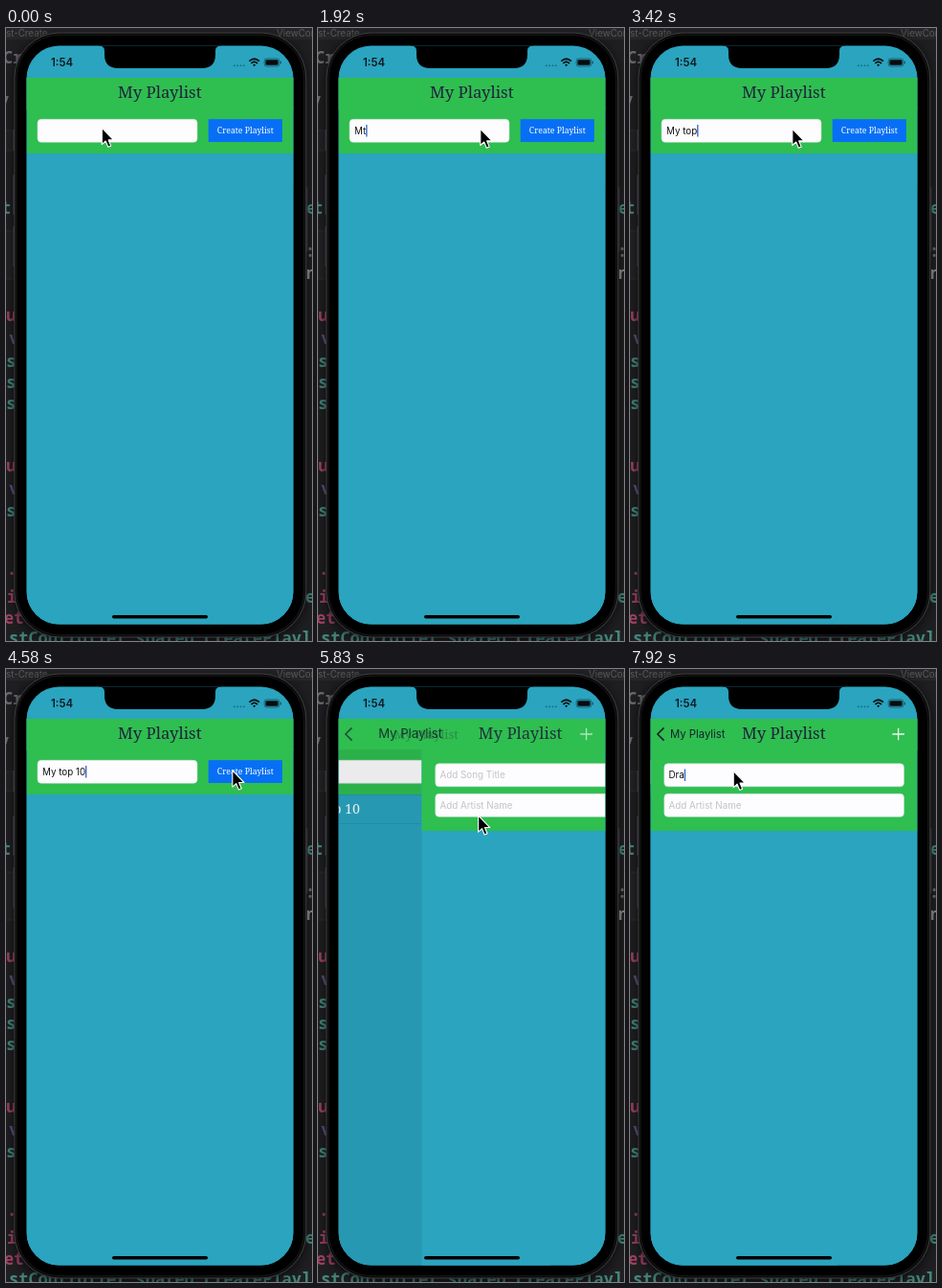
These frames come from a looping animation (320 by 640 pixels, 8 s). An HTML page:

```html
<!DOCTYPE html>
<html lang="en">
<head>
<meta charset="utf-8">
<title>Playlist app</title>
<style>
  html, body { margin: 0; width: 100%; height: 100%; overflow: hidden; background: #1e1e21; }
  svg { display: block; width: 100vw; height: 100vh; }
  text { white-space: pre; }
  .slab { font-family: "Noto Serif", serif; }
  .sans { font-family: Inter, Roboto, sans-serif; font-size: 9.8px; }
  .code { font: bold 17px "Noto Sans Mono", monospace; opacity: .85; }
  .title { font-size: 16.8px; fill: #20213c; }
  .hint { fill: #c3c3c7; }
  .field { fill: #fdfcff; stroke: #d5e3da; stroke-width: .5; }
  .caret { fill: #2c63cf; }
</style>
</head>
<body>
<svg viewBox="0 0 320 640" preserveAspectRatio="none">
  <defs>
    <clipPath id="screen"><rect x="21.5" y="18.5" width="279" height="604" rx="34"/></clipPath>
    <clipPath id="body"><rect x="21.5" y="84" width="279" height="539"/></clipPath>
    <filter id="blur" x="-10%" y="-10%" width="120%" height="120%"><feGaussianBlur stdDeviation="6"/></filter>
  </defs>

  <rect width="320" height="640" fill="#1f1f22"/>
  <rect width="320" height="12" fill="#262629"/>
  <g id="code" class="code"></g>
  <rect x="8" y="6" width="306" height="634" rx="48" opacity=".6" filter="url(#blur)"/>

  <g fill="#2c2c2f">
    <rect x="7" y="106" width="3" height="22" rx="1"/>
    <rect x="7" y="153" width="3" height="42" rx="1"/>
    <rect x="7" y="207" width="3" height="42" rx="1"/>
    <rect x="312.5" y="166" width="3" height="68" rx="1"/>
  </g>
  <rect x="8.9" y="5" width="304.9" height="631" rx="47" fill="#0c0c0d" stroke="#444447" stroke-width=".9"/>
  <rect x="11.2" y="7.4" width="300.2" height="626.2" rx="45" fill="#000" stroke="#1d1d1f" stroke-width=".7"/>

  <g clip-path="url(#screen)">
    <rect x="21" y="18" width="280" height="605" fill="#2aa4bf"/>
    <rect x="21" y="52" width="280" height="33" fill="#2fbe50"/>

    <g clip-path="url(#body)">
      <g id="listPage">
        <rect x="21.5" y="84" width="279" height="540" fill="#2aa4bf"/>
        <rect x="21.5" y="84" width="279" height="47" fill="#2fbe50"/>
        <rect class="field" x="33" y="95.3" width="167" height="24" rx="4"/>
        <g id="create">
          <rect x="211.7" y="95.2" width="77.2" height="23.8" fill="#076ff5"/>
          <text class="slab" x="250.3" y="110.4" text-anchor="middle" font-size="8.7" fill="#fff">Create Playlist</text>
        </g>
        <text id="nameText" class="sans" x="38" y="110.8" fill="#111"></text>
        <rect id="nameCaret" class="caret" y="101" width="1.3" height="12.5"/>
        <g id="row">
          <path d="M21.5 131.5H300.5M36 161.5H300.5" stroke="#000" stroke-opacity=".12" stroke-width=".7"/>
          <text class="slab" x="36" y="151.4" font-size="14" fill="#fff">My top 10</text>
          <text class="slab" x="286" y="151.4" font-size="12.4" text-anchor="end" fill="#fff">0 songs</text>
        </g>
        <rect id="dim" x="21.5" y="84" width="279" height="540"/>
      </g>
      <g id="songPage">
        <rect x="21.5" y="84" width="279" height="540" fill="#2aa4bf"/>
        <rect x="21.5" y="84" width="279" height="85" fill="#2fbe50"/>
        <rect class="field" x="35.8" y="98.8" width="250.7" height="24" rx="4"/>
        <rect class="field" x="35.8" y="130.3" width="250.7" height="24" rx="4"/>
        <text id="songHint" class="sans hint" x="40.5" y="114.4">Add Song Title</text>
        <text class="sans hint" x="40.5" y="145.9">Add Artist Name</text>
        <text id="songText" class="sans" x="40.5" y="114.4" fill="#111"></text>
        <rect id="songCaret" class="caret" y="104.5" width="1.3" height="12.5"/>
      </g>
    </g>

    <text id="oldTitle" class="slab title">My Playlist</text>
    <text id="newTitle" class="slab title">My Playlist</text>
    <text id="backLabel" class="sans" style="font-size:11.3px" fill="#18212c">My Playlist</text>
    <g id="navIcons" fill="none">
      <path d="M35 61.8L28.8 68L35 74.2" stroke="#18212c" stroke-width="1.7" stroke-linecap="round" stroke-linejoin="round"/>
      <path d="M274.3 68H287M280.6 61.7V74.3" stroke="#e8f8eb" stroke-width="1.3"/>
    </g>

    <text class="sans" x="47" y="40.2" style="font-size:11.4px" font-weight="600" fill="#101820">1:54</text>
    <g fill="#1b7488">
      <circle cx="238.9" cy="39.2" r="1"/><circle cx="242.2" cy="39.2" r="1"/>
      <circle cx="245.5" cy="39.2" r="1"/><circle cx="248.8" cy="39.2" r="1"/>
    </g>
    <g fill="none" stroke="#0a1013" stroke-width="1.7">
      <path d="M254.4 34.7Q259.6 29.8 264.9 34.7M256.3 37Q259.6 33.9 263 37"/>
      <path d="M258.1 38.3Q259.6 37 261.2 38.3L259.6 40.2Z" fill="#0a1013" stroke="none"/>
    </g>
    <rect x="270.2" y="32" width="15.6" height="8" rx="2.3" fill="none" stroke="#15515f" stroke-width=".8"/>
    <rect x="271.4" y="33.2" width="13.2" height="5.6" rx="1.3" fill="#080c0e"/>
    <rect x="286.7" y="34.6" width="1.1" height="2.8" rx=".5" fill="#15515f"/>
    <path d="M97 17V18.5Q103 18.5 103 24V28C103 37 108 42 117 42H205C214 42 219 37 219 28V24Q219 18.5 225 18.5V17Z"/>
    <rect x="111" y="613" width="100" height="3.6" rx="1.8"/>
  </g>

  <path id="pointer" d="M0 0V17.2L3.9 13.7L6.5 20L9.4 18.8L6.8 12.6H12.2Z"
        fill="#000" stroke="#fff" stroke-width="1.1" stroke-linejoin="round"/>
</svg>

<script>
const LOOP = 8000;
const $ = id => document.getElementById(id);

// Editor text peeking out around the phone: x, baseline, colour, text
const PINK = '#b8476f', TEAL = '#4b9a8d', GREY = '#77777b', VIOLET = '#6c5a92';
const snippets = [
  [-3, 37, GREY, 'Cr'], [-7, 81, GREY, 'y'], [-5, 194, TEAL, 't'],
  [-10, 306, PINK, 'fu'], [-7, 330, VIOLET, '.v'], [-10, 354, TEAL, 'ls'],
  [-10, 376, TEAL, 'ls'], [-10, 398, TEAL, 'ls'], [-10, 463, PINK, 'fu'],
  [-7, 487, VIOLET, '.v'], [-10, 510, TEAL, 'ls'], [1, 571, PINK, '.'],
  [1, 600, PINK, 'i'], [-2, 622, PINK, 'ett'], [3, 643, TEAL, 'stController.shared.createPlayl'],
  [314, 194, TEAL, 'e'], [313, 239, GREY, ':'], [314, 262, '#a0a0a4', 'n'], [313, 600, TEAL, 'e']
];
const codeText = ([x, y, fill, text]) => `<text x="${x}" y="${y}" fill="${fill}">${text}</text>`;
const tabText = (x, text) =>
  `<text class="sans" x="${x}" y="8.5" fill="#626266" font-weight="400">${text}</text>`;
$('code').innerHTML =
  tabText(0, 'st-Create') + tabText(283, 'ViewCont') +
  '<path d="M0 107H9V128H0M0 212H9V262H0" fill="#242427" stroke="#303033"/>' +
  snippets.map(codeText).join('');

const nameKeys = [
  [0, ''], [1450, 'M'], [1750, 'Mt'], [2250, 'M'], [2500, 'My'], [2670, 'My '],
  [2920, 'My t'], [3080, 'My to'], [3330, 'My top'], [3580, 'My top '],
  [3830, 'My top 1'], [4050, 'My top 10'], [4920, '']
];
const songKeys = [[0, ''], [7080, 'D'], [7420, 'Dr'], [7750, 'Dra']];

// Pointer moves: start, end, x, y
const moves = [
  [400, 950, 169.8, 105.3], [4200, 4700, 248, 106],
  [5000, 5400, 170, 154.8], [5760, 6360, 108.2, 106.5]
];
const ROW_SHOWN = 4920, PUSH_START = 5670, PUSH_TIME = 500;

const clamp = v => Math.max(0, Math.min(1, v));
const mix = (a, b, p) => a + (b - a) * p;
const smooth = u => u * u * (3 - 2 * u);
const show = (id, opacity) => $(id).setAttribute('opacity', opacity);
const place = (id, x, y = 0, scale = 1) =>
  $(id).setAttribute('transform', `translate(${x} ${y}) scale(${scale})`);

function typeField(prefix, keys, t, focusAt) {
  const [since, value] = keys.filter(k => k[0] <= t).pop();
  const text = $(prefix + 'Text'), caret = $(prefix + 'Caret');
  text.textContent = value;
  const width = value ? text.getComputedTextLength() : 0;
  caret.setAttribute('x', +text.getAttribute('x') + width);
  const phase = (t - Math.max(since, focusAt)) % 1000;
  const blink = phase < 850 ? 1 - clamp((phase - 550) / 150) : clamp((phase - 850) / 150);
  show(prefix + 'Caret', t < focusAt ? 0 : blink);
  return value;
}

function movePointer(t) {
  let x = 100.3, y = 104.3;
  for (const [start, end, toX, toY] of moves) {
    const p = smooth(clamp((t - start) / (end - start)));
    x = mix(x, toX, p);
    y = mix(y, toY, p);
  }
  place('pointer', x, y);
}

function pushPage(t) {
  const p = 1 - (1 - clamp((t - PUSH_START) / PUSH_TIME)) ** 3;
  const fadeIn = clamp(p * 1.3);
  place('listPage', -84 * p);
  place('songPage', 279 * (1 - p));
  show('dim', .1 * p);
  place('oldTitle', mix(117, 62, p), 72.8, mix(1, .67, p));
  show('oldTitle', 1 - p);
  place('newTitle', mix(280, 117, p), 72.8);
  show('newTitle', fadeIn);
  place('backLabel', mix(110, 42, p), 72, mix(1.52, 1, p));
  show('backLabel', fadeIn);
  show('navIcons', p);
}

function draw(t) {
  typeField('name', nameKeys, t, 420);
  const song = typeField('song', songKeys, t, 6580);
  show('songHint', song ? 0 : 1);
  show('row', t >= ROW_SHOWN ? 1 : 0);
  show('create', t >= 4800 && t < ROW_SHOWN ? .5 : 1);
  pushPage(t);
  movePointer(t);
}

const begin = performance.now();
function frame() {
  draw((performance.now() - begin) % LOOP);
  requestAnimationFrame(frame);
}
frame();
</script>
</body>
</html>
```
